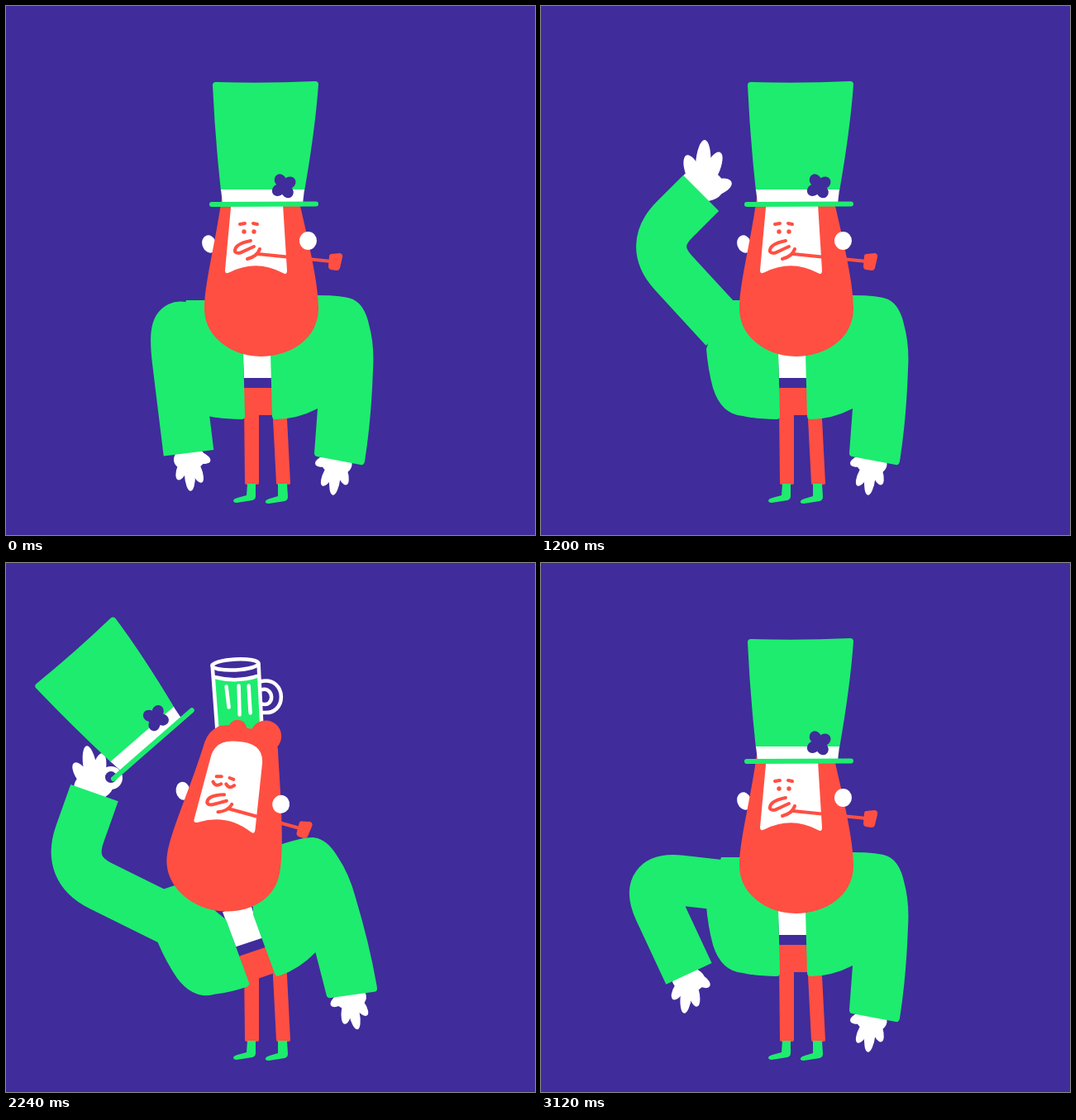
Recreate the animation shown at these times as an HTML page. Size 640x640 px, loop 3200 ms.

```html
<!DOCTYPE html>
<html lang="en">
<head>
<meta charset="utf-8">
<title>Tip of the hat</title>
<style>
  html, body { margin: 0; width: 100%; height: 100%; overflow: hidden; background: #402c9b; }
  svg { display: block; width: 100vw; height: 100vh; }
  .green { fill: #1eec6e; }
  .red { fill: #ff4f42; }
  .white { fill: #fff; }
  .night { fill: #402c9b; }
  .line { fill: none; stroke-linecap: round; stroke-linejoin: round; }
  .ink { stroke: #ff4f42; stroke-width: 4; }
  .glass { stroke: #fff; stroke-width: 4.5; }
  #sleeve { fill: none; stroke: #1eec6e; stroke-width: 61; }
</style>
</head>
<body>
<svg viewBox="0 0 640 640">
  <g id="legs">
    <path class="red" d="M288 480H306L306 577Q306 579 304 579H291Q289 579 289 577ZM322 480H339L344 577Q344 579 342 579H329Q327 579 327 577Z"/>
    <path class="green" d="M292 578H302L302 593Q302 597 298 598L279 601Q275 601 275 598Q276 596 280 595L291 592ZM329 578H340L341 594Q341 598 337 599L318 602Q313 602 314 599Q315 597 319 596L329 593Z"/>
  </g>
  <g id="body">
    <path class="red" d="M288 461H322V495H288Z"/>
    <path class="white" d="M286 405H321V452H288Z"/>
    <path class="night" d="M287 450H322V462H287Z"/>
    <g class="hand white" transform="translate(401 546) rotate(101)"></g>
    <path class="green" d="M218 356H250L287 415L289 496Q289 500 285 500Q262 500 244 496Q218 494 208 462Q202 440 200 415Z"/>
    <path class="green" d="M320 420L340 350H378Q408 350 420 355Q434 362 439 385Q446 410 444 440Q442 500 434 551Q433 556 429 555L376 545Q373 544 373 541L377 487Q352 500 326 500Q322 500 322 496Z"/>
  </g>
  <g id="limb">
    <g id="leftHand" class="hand white"></g>
    <path id="sleeve"/>
  </g>
  <g id="grip">
    <circle class="white" cx="-3" cy="-1" r="14"/>
    <circle class="night" cx="-3" cy="-2" r="7"/>
  </g>
  <g id="mug">
    <path class="green" d="M260 138Q286 145 314 136L318 205H264Z"/>
    <path class="line glass" d="M258 122L264 203M314 121L318 200M259 136Q286 144 314 135M316 142C349 134 350 186 317 179M317 152C333 147 334 174 318 169"/>
    <path class="line glass" d="M275 148L278 173M290 147L291 182M302 147L304 180"/>
    <ellipse class="line glass" cx="286" cy="121.500" rx="28" ry="6.500" transform="rotate(-3 286 121)"/>
  </g>
  <g id="head">
    <ellipse class="white" cx="246" cy="288" rx="8.500" ry="11" transform="rotate(-20 246 288)"/>
    <path class="red" d="M262 225C254 285 240 335 240 366C240 402 275 424 308 424C345 424 378 402 378 366C378 335 366 285 352 225Q348 200 325 200H290Q266 202 262 225Z"/>
    <g class="red">
      <circle cx="280.500" cy="210.500" r="8.500"/>
      <circle cx="298.500" cy="203" r="11"/>
      <circle cx="333.500" cy="206" r="19"/>
    </g>
    <path class="white" d="M265 320L272 244Q273 220 300 218Q333 214 335 240L340 320Q340 326 335 323Q303 306 271 322Q265 325 265 320Z"/>
    <path class="line ink" d="M283 264L289 263M299 263L304 264M296 284Q276 288 277 297Q280 301 287 297L300 291M307 294Q304 303 292 306M305 300L394 309"/>
    <path class="red" d="M394 300L404 299Q408 300 407 304L404 317Q403 320 400 320L393 319Q390 318 390 315L391 303Q391 300 394 300Z"/>
    <g id="open" class="red">
      <circle cx="288" cy="273" r="2.700"/>
      <circle cx="300" cy="273" r="2.700"/>
    </g>
    <path id="shut" class="line ink" d="M280 271Q284 277 290 272M296 271Q301 277 306 271"/>
    <ellipse class="white" cx="365.500" cy="284" rx="10.500" ry="11"/>
  </g>
  <g id="hat">
    <path class="green" d="M254 92Q314 94 374 91Q378 91 378 95Q374 150 361 224H260Q253 160 250 96Q250 92 254 92Z"/>
    <path class="white" d="M260 222H361L359 239H262Z"/>
    <path class="line" stroke="#1eec6e" stroke-width="6" d="M249 240L375 239.500"/>
    <g id="clover" class="night" transform="translate(336 218)"></g>
  </g>
</svg>
<script>
const STEP = 80, LOOP = 3200;
const $ = id => document.getElementById(id);
const move = (id, value) => $(id).setAttribute('transform', value);
const show = (id, on) => $(id).setAttribute('visibility', on ? 'visible' : 'hidden');
const mix = (a, b, k) => a.map((v, i) => v + (b[i] - v) * k);

// Progress 0..1 through a stretch of time, and its easings.
const ramp = (t, from, to) => Math.min(Math.max((t - from) / (to - from), 0), 1);
const easeOut = (k, power) => 1 - (1 - k) ** power;
const smooth = k => k * k * (3 - 2 * k);

// A hand points along +x from the wrist, thumb first.
const fingers = [[62, 28], [17, 39], [-4, 46], [-29, 35]];
const handMarkup = '<ellipse cx="7" rx="14" ry="19"/>' + fingers.map(([angle, len]) =>
  `<ellipse cx="${len * 0.55}" rx="${len * 0.45}" ry="6.500" transform="rotate(${angle})"/>`).join('');
document.querySelectorAll('.hand').forEach(el => { el.innerHTML = handMarkup; });

$('clover').innerHTML = [0, 1, 2, 3].map(i =>
  `<ellipse cy="-8" rx="7" ry="8" transform="rotate(${i * 88 - 30})"/>`).join('');

// Free arm: elbow x, y, forearm length, forearm angle, wrist bend, hand size.
const rest = [202, 386, 156, 83, 0, 1];
const low = [124, 379, 130, 65, 28, 1.05];
const drop = [150, 365, 100, 125, 20, 1.05];
const out = [150, 325, 85, 190, 0, 1];
const up = [130, 290, 90, 315, -37, 1.4];
const swing = [[0, rest], [800, rest], [960, low], [1120, out], [1200, up],
  [2960, up], [3040, drop], [3120, low], [3200, rest]];

function freeArm(t) {
  const i = swing.findIndex(([end]) => t < end);
  const [from, a] = swing[i - 1], [to, b] = swing[i];
  return mix(a, b, ramp(t, from, to));
}

// While holding the brim, the wrist follows the hat.
function holdingArm(lean, hat) {
  const elbow = [130 - 45 * lean, 290 + 65 * lean];
  const dx = hat.x - 23 - elbow[0], dy = hat.y + 17 - elbow[1];
  const angle = Math.atan2(dy, dx) * 180 / Math.PI + 360;
  return [...elbow, Math.hypot(dx, dy), angle, -25, 1.25];
}

function drawArm([x, y, len, angle, bend, size], lean) {
  const elbow = [x, y];
  const shoulder = [222 - 17 * lean, 390 + 35 * lean];
  const a = angle * Math.PI / 180;
  const cuff = [x + len * Math.cos(a), y + len * Math.sin(a)];
  const near = end => mix(elbow, end, Math.min(45 / Math.hypot(end[0] - x, end[1] - y), 0.5));
  $('sleeve').setAttribute('d', `M${shoulder}L${near(shoulder)}Q${elbow} ${near(cuff)}L${cuff}`);
  const flip = angle > 180 ? 1 : -1;
  move('leftHand', `translate(${cuff}) rotate(${angle + bend}) scale(${size} ${size * flip})`);
}

function render(t) {
  const lean = 1.24 * (easeOut(ramp(t, 1280, 1680), 3) - smooth(ramp(t, 2640, 2920)));
  const sink = 12 * (easeOut(ramp(t, 0, 720), 2) - smooth(ramp(t, 720, 1120)));
  const hat = { x: 249 - 96 * lean, y: 240 - 45 * lean + 50 * lean * lean };
  const holding = t >= 1280 && t < 2960;

  move('body', `translate(${3 * lean} ${5 * lean + sink}) rotate(${-15 * lean} 306 495)`);
  move('head', `translate(${-27 * lean} ${-4 * lean}) rotate(${7.8 * lean} 290 294)`);
  move('mug', `translate(${35 * (1 - lean)} ${6 * (lean - 1)})`);
  move('hat', `translate(${hat.x} ${hat.y}) rotate(${-33 * lean}) translate(-249 -240)`);
  move('grip', `translate(${hat.x} ${hat.y})`);
  move('limb', `translate(0 ${sink})`);
  drawArm(holding ? holdingArm(lean, hat) : freeArm(t), lean);

  show('grip', holding);
  show('mug', lean > 0.2);
  show('open', lean <= 0.3);
  show('shut', lean > 0.3);
}

const start = performance.now();
function tick() {
  const t = (performance.now() - start) % LOOP;
  render(Math.floor(t / STEP) * STEP);
  requestAnimationFrame(tick);
}
tick();
</script>
</body>
</html>
```
